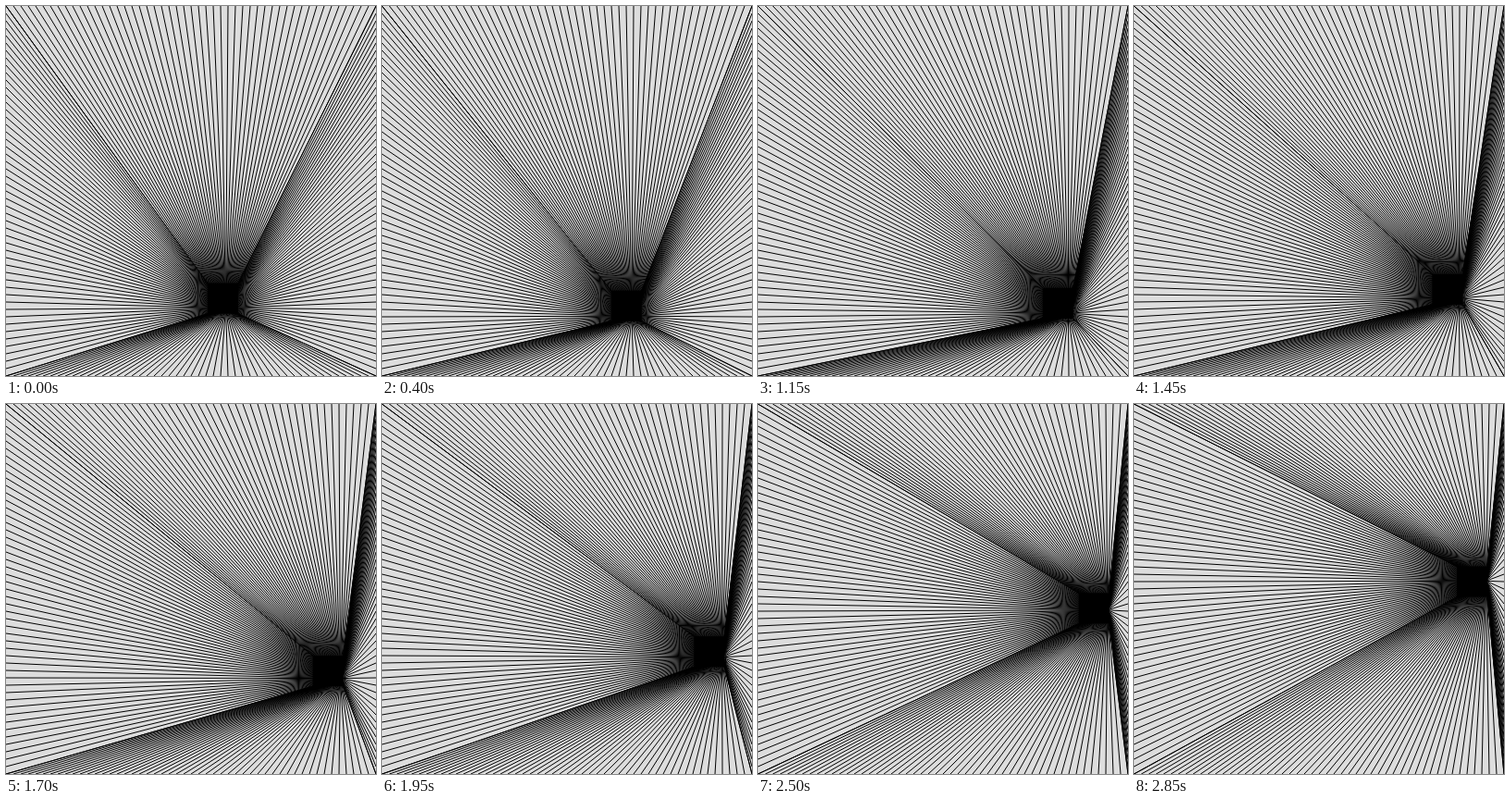
Write an HTML page with a canvas that moves like this. It is 400 px wide and 400 px high and loops after 3000 ms.

```html
<!DOCTYPE html>
<html>
<head>
<meta charset="utf-8">
<title>Converging lines</title>
<style>
html, body { margin: 0; width: 100%; height: 100%; overflow: hidden; background: #ddd; }
canvas { display: block; }
</style>
</head>
<body>
<canvas id="stage" width="400" height="400"></canvas>
<script>
const SIZE = 400, GAP = 8, HOLE = 33;
const LOOP = 3000, TICK = 130.8, FIRST = 99;
const ctx = document.getElementById('stage').getContext('2d');

// Key points of the vanishing point: time, x, y
const path = [[0, 237.5, 326.5], [400, 273.5, 336], [900, 317.5, 342], [1450, 353.5, 313],
  [1950, 368, 272], [2500, 378.5, 218.5], [2850, 380.5, 191]];

function slope(i, axis) {
  const a = path[Math.max(i - 1, 0)], b = path[Math.min(i + 1, path.length - 1)];
  return (b[axis] - a[axis]) / (b[0] - a[0]);
}

// Smooth curve through the key points
function position(t, axis) {
  let i = 0;
  while (i < path.length - 2 && t >= path[i + 1][0]) i++;
  const a = path[i], b = path[i + 1], span = b[0] - a[0], u = (t - a[0]) / span;
  const ease = u * u * (3 - 2 * u);
  return a[axis] + (b[axis] - a[axis]) * ease
    + span * u * (1 - u) * ((1 - u) * slope(i, axis) - u * slope(i + 1, axis));
}

// The picture advances in even ticks and holds between them
function hold(t) {
  return t < FIRST ? 0 : FIRST + Math.floor((t - FIRST) / TICK) * TICK;
}

function draw(t) {
  const x = position(t, 1), y = position(t, 2), shrink = 1 - HOLE / SIZE;
  const ray = (px, py) => {
    ctx.beginPath();
    ctx.moveTo(px, py);
    ctx.lineTo(x, y);
    ctx.stroke();
  };
  ctx.fillStyle = '#ddd';
  ctx.fillRect(0, 0, SIZE, SIZE);
  for (let p = 0; p <= SIZE; p += GAP) {
    ray(p, 0);
    ray(p, SIZE);
    ray(0, p);
    ray(SIZE, p);
  }
  // Dark square at the far end of the tunnel
  ctx.fillStyle = '#000';
  ctx.fillRect(x * shrink, y * shrink, HOLE, HOLE);
}

const start = performance.now();
function frame() {
  draw(hold((performance.now() - start) % LOOP));
  requestAnimationFrame(frame);
}
frame();
</script>
</body>
</html>
```
